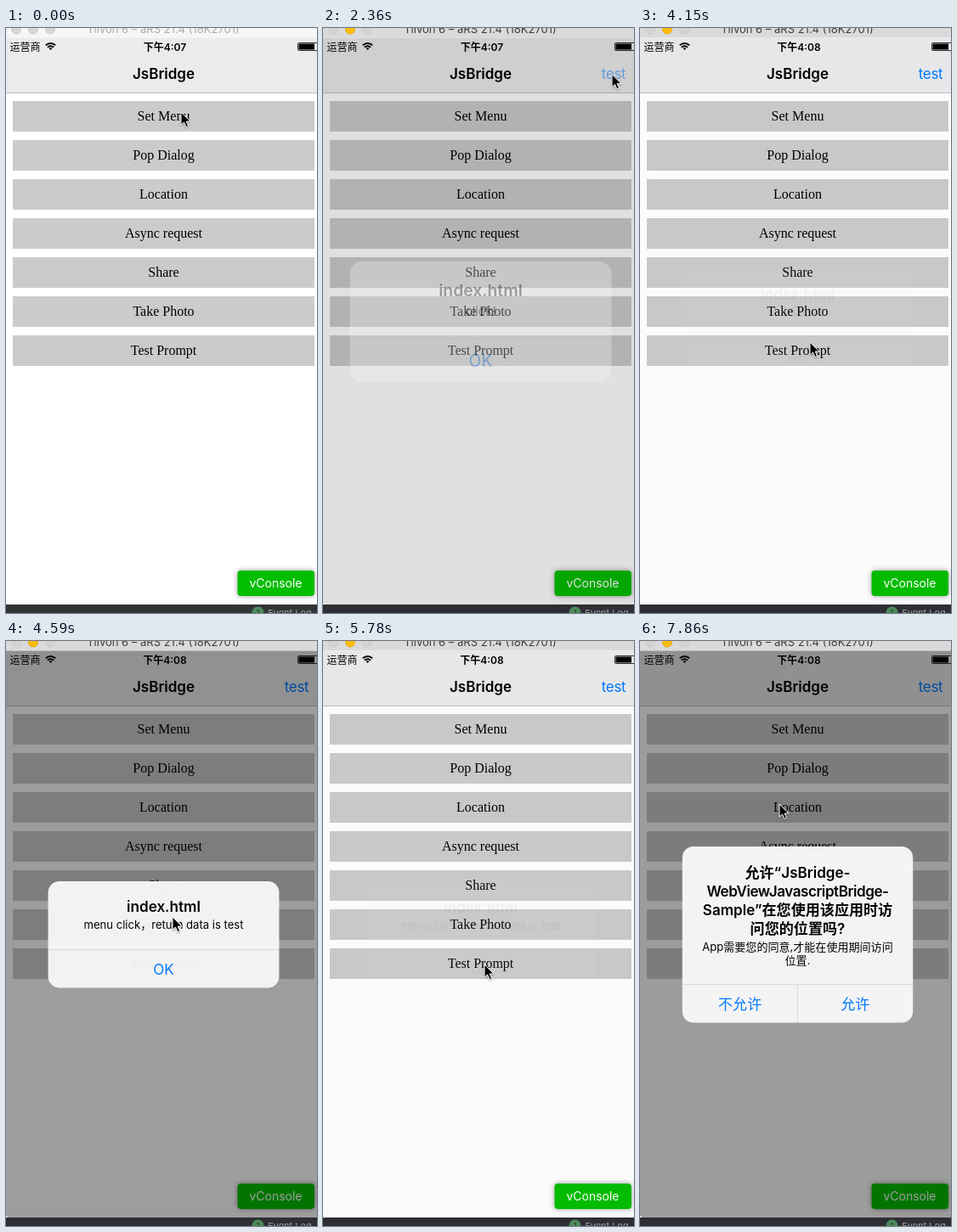
An HTML page for the animation above (8 s loop, 366x689 px).

```html
<!DOCTYPE html>
<html lang="zh">
<head>
<meta charset="utf-8">
<style>
  html, body { margin: 0; width: 100%; height: 100%; overflow: hidden; background: #fff; }
  svg { display: block; width: 366px; height: 689px; }
  text { font-family: Inter, "Noto Sans CJK SC", "Noto Sans CJK", sans-serif; text-anchor: middle; white-space: pre; }
  .serif { font-family: "Liberation Serif", serif; }
  .bold { font-weight: 600; }
  .blue { fill: #007aff; }
  .alert { transform-origin: 185.5px 345.75px; }
  #console { filter: drop-shadow(0 0 3px rgba(0, 0, 0, .4)); }
  #cursor { filter: drop-shadow(0 1px 1px rgba(0, 0, 0, .35)); }
</style>
</head>
<body>
<svg id="stage" viewBox="0 0 366 689"></svg>
<script>
const LOOP = 8000, STEP = 148.3, LAST = 53;

const text = (x, y, size, str, attrs = '') =>
  `<text x="${x}" y="${y}" font-size="${size}" ${attrs}>${str}</text>`;
const rect = (x, y, w, h, fill, attrs = '') =>
  `<rect x="${x}" y="${y}" width="${w}" height="${h}" fill="${fill}" ${attrs}/>`;

const alertBox = (id, top, line, content) => `<g id="${id}" class="alert">
  ${rect(50.5, top, 270, 691.5 - 2 * top, '#f7f7f7', 'rx="13"')}
  ${rect(50.5, line, 270, .8, '#d3d3d6')}${content}</g>`;

const okAlert = (id, message) => alertBox(id, 283.5, 363, `
  <path class="pressed" d="M50.5 363h270v32a13 13 0 0 1-13 13h-244a13 13 0 0 1-13-13z" fill="#e5e5e6"/>
  ${text(185.5, 319.5, 17, 'index.html', 'class="bold"')}
  ${text(185.5, 339.5, 13, message)}
  ${text(185.5, 392.3, 17, 'OK', 'class="blue"')}`);

const locationAlert = alertBox('place', 242.5, 404, `
  ${text(185.5, 279, 17, '允许“JsBridge-', 'class="bold"')}
  ${text(185.5, 301, 17, 'WebViewJavascriptBridge-', 'class="bold" letter-spacing="-.45"')}
  ${text(185.5, 323, 17, 'Sample”在您使用该应用时访', 'class="bold"')}
  ${text(185.5, 345, 17, '问您的位置吗?', 'class="bold"')}
  ${text(185.5, 365, 13, 'App需要您的同意,才能在使用期间访问')}
  ${text(185.5, 381, 13, '位置.')}
  ${rect(185, 404, .8, 45, '#d3d3d6')}
  ${text(118, 433.5, 17, '不允许', 'class="blue"')}
  ${text(253, 433.5, 17, '允许', 'class="blue"')}`);

const labels = ['Set Menu', 'Pop Dialog', 'Location', 'Async request', 'Share', 'Take Photo', 'Test Prompt'];
const buttons = labels.map((label, i) =>
  rect(8, 86 + 46 * i, 355, 36, '#cbcbcb') +
  text(185.5, 109 + 46 * i, 16, label, 'class="serif"')).join('');

const statusBar = `
  ${text(22.5, 26.5, 12, '运营商')}
  <g fill="none" stroke="#000" stroke-width="1.9">
    <path d="M46.8 20.3q5.7-4.8 11.4 0M48.9 22.7q3.6-3 7.2 0"/>
    <path d="M50.6 24l1.9 2 1.9-2q-1.9-1.4-3.8 0z" fill="#000" stroke="none"/>
  </g>
  ${text(187, 26.5, 12, '', 'id="clock" class="bold"')}
  ${rect(343.5, 17.5, 25, 9, 'none', 'rx="1.5" stroke="#000" stroke-width=".8"')}
  ${rect(344.5, 18.5, 18.5, 7, '#000')}`;

stage.innerHTML = `
  ${rect(0, 0, 366, 12, '', 'id="bar"')}
  ${[12, 32, 52].map(x => `<circle class="light" cx="${x}" cy="1.5" r="5.5" stroke-width=".8"/>`).join('')}
  ${text(185, 6, 13, 'Tilvon 6 – aRS 21.4 (18K2701)', 'id="caption"')}
  ${rect(0, 679, 366, 10, '', 'id="desk"')}
  <circle cx="296.5" cy="688.5" r="7" fill="#4c8a5a"/>
  ${text(296.5, 692, 9, '1', 'fill="#26352b"')}
  ${text(334, 692.5, 11, 'Event Log', 'fill="#a0a0a2"')}
  <path d="M0 11.5h366v667.5H4q-4 0-4-4z" fill="#fff"/>
  ${rect(0, 11.5, 366, 65, '#ebebed')}
  ${rect(0, 76, 366, .8, '#b5b5b8')}
  ${statusBar}
  ${text(185.5, 60, 17, 'JsBridge', 'class="bold"')}
  ${text(342, 60, 17, 'test', 'id="menu" class="blue" letter-spacing="-.3"')}
  ${buttons}
  ${rect(272.5, 639, 90.5, 30, '#04be02', 'id="console" rx="4"')}
  ${text(317.5, 659, 14, 'vConsole', 'fill="#fff"')}
  <path id="dim" d="M0 11.5h366v667.5H4q-4 0-4-4z"/>
  ${okAlert('click', 'click!')}
  ${okAlert('reply', 'menu click，return data is test')}
  ${locationAlert}
  <path id="cursor" d="M0 0V15.2L3.5 12 6 17.6 8.6 16.5 6.2 11H11Z" stroke="#fff" stroke-width="1"/>`;

const $ = id => document.getElementById(id);
const lights = document.querySelectorAll('.light');

// Alerts zoom in from `start` and fade in place after `press`; units are steps
const alerts = [
  { el: $('click'), start: 16, press: 26 },
  { el: $('reply'), start: 29, press: 37 },
  { el: $('place'), start: 50.8, press: 99 },
];

// step, x, y
const route = [
  [7, 206, 99], [8, 209, 97], [11, 272, 76], [13, 346, 56], [14, 350, 49], [15, 341, 51],
  [17, 339, 58], [20, 280, 220], [23, 206, 368], [26, 202, 379], [28, 200, 370],
  [31, 196, 325], [32, 195, 327], [35, 191, 377], [39, 190, 381], [41, 209, 350],
  [44, 188, 240], [46, 164, 192],
];

function cursorAt(k) {
  const i = route.findIndex(p => p[0] > k);
  if (i < 0) return route[route.length - 1].slice(1);
  if (i === 0) return route[0].slice(1);
  const a = route[i - 1], b = route[i], f = (k - a[0]) / (b[0] - a[0]);
  return [a[1] + (b[1] - a[1]) * f, a[2] + (b[2] - a[2]) * f];
}

function draw(k) {
  const active = k > 0;
  $('bar').style.fill = active ? '#dbdadb' : '#f6f6f6';
  $('caption').style.fill = active ? '#3e3e3e' : '#acacac';
  $('desk').style.fill = active ? '#2f2e35' : '#333438';
  lights.forEach((el, i) => {
    const yellow = active && i === 1;
    el.style.fill = yellow ? '#fdbd0b' : active ? '#d4d3d4' : '#d6d6d6';
    el.style.stroke = yellow ? '#e0a100' : '#c6c6c6';
  });
  $('clock').textContent = k < 22 ? '下午4:07' : '下午4:08';
  $('menu').style.opacity = k < 4 ? 0 : k === 15 || k === 16 ? .5 : 1;

  let shade = 0;
  for (const { el, start, press } of alerts) {
    const shown = k < start ? 0 : 1 - .7 * Math.exp(-1.5 * (k - start));
    const left = k > press ? Math.exp(-1.6 * (k - press)) : 1;
    const alpha = left < .01 ? 0 : shown * left;
    el.style.opacity = alpha;
    el.style.transform = `scale(${1.2 - .2 * shown})`;
    const pressed = el.querySelector('.pressed');
    if (pressed) pressed.style.opacity = k === press || k === press - 1 ? 1 : 0;
    shade = Math.max(shade, alpha);
  }
  $('dim').style.opacity = .4 * shade;
  $('cursor').setAttribute('transform', `translate(${cursorAt(k)})`);
}

function tick() {
  const t = performance.now() % LOOP;
  draw(Math.min(LAST, Math.floor((t + 15) / STEP)));
  requestAnimationFrame(tick);
}
tick();
</script>
</body>
</html>
```
